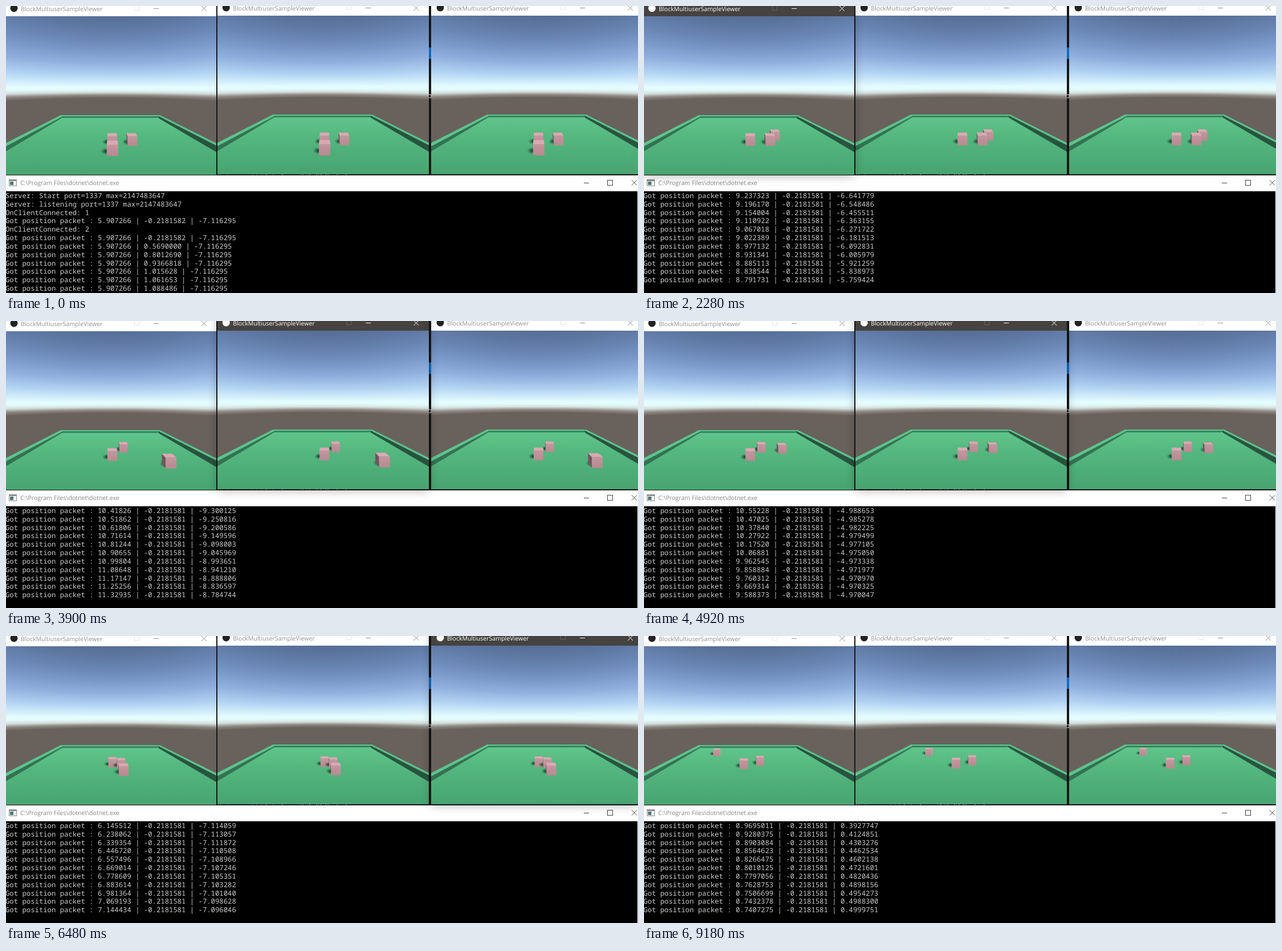
These frames come from a looping animation (1109 px wide and 505 px high, 9.24 s). An HTML page with a canvas:

```html
<!DOCTYPE html>
<html lang="en">
<head>
<meta charset="utf-8">
<title>Shared cubes</title>
<style>
  html, body { margin: 0; width: 100%; height: 100%; overflow: hidden; background: #000; }
  canvas { display: block; }
</style>
</head>
<body>
<canvas id="stage" width="1109" height="505"></canvas>
<script>
let ctx = document.getElementById('stage').getContext('2d');
const LOOP = 9240, STEP = 60, FIRST_MOVE = 900, LAST_MOVE = 8580, PACKET_MS = 16;
const LEAD_MS = 10, LAG_MS = 25;
const UI_FONT = '10.6px "Open Sans", "Noto Sans", sans-serif';
const MONO_FONT = '12.27px "Noto Sans Mono", "DejaVu Sans Mono", monospace';

// Key points of each player's walk: [ms, x, z]
const players = [
  { sends: 0, path: [[900, 5.907, -9.35], [1800, 9.7, -8.1], [2280, 8.78, -5.74], [2520, 7.28, -4.6],
    [5130, 7.28, -4.6], [5640, 5.95, -4.55], [7260, 5.95, -4.55], [7380, 5.95, -4.04],
    [7800, 3.9, -1.3], [8580, 0.7407275, 0.4999751]] },
  { sends: 2700, path: [[2760, 7.97, -7.116], [3430, 8.9, -9.85], [3900, 11.366, -8.759], [4200, 12.55, -7.2],
    [4750, 10.58, -4.99], [4920, 9.57, -4.970035], [5640, 6.97, -4.970035],
    [6700, 6.97, -4.970035], [6920, 7.15, -4]] },
  { sends: 6230, path: [[6230, 5.907, -7.116295], [6480, 7.191, -7.094], [6680, 7.72, -6.3],
    [7020, 6.3, -5.15], [7380, 5.167, -5.114]] }
];

// Monotone cubic interpolation: smooth, and still at the ends
function position(path, t) {
  const last = path.length - 1;
  if (t <= path[0][0]) return path[0].slice(1);
  if (t >= path[last][0]) return path[last].slice(1);
  const i = path.findIndex(p => p[0] > t) - 1;
  const span = path[i + 1][0] - path[i][0], u = (t - path[i][0]) / span;
  const slope = (j, k) => (path[j + 1][k] - path[j][k]) / (path[j + 1][0] - path[j][0]);
  const tangent = (j, k) => {
    if (j === 0 || j === last) return 0;
    const m = slope(j - 1, k), n = slope(j, k);
    return m * n > 0 ? 2 * m * n / (m + n) : 0;
  };
  return [1, 2].map(k => {
    const p = path[i][k], q = path[i + 1][k];
    return p + (q - p) * u * u * (3 - 2 * u) +
      span * u * (1 - u) * (tangent(i, k) * (1 - u) - tangent(i + 1, k) * u);
  });
}

function rect(x, y, w, h, color) { ctx.fillStyle = color; ctx.fillRect(x, y, w, h); }

function poly(color, ...points) {
  ctx.fillStyle = color;
  ctx.beginPath();
  points.forEach(p => ctx.lineTo(...p));
  ctx.fill();
}

function text(str, x, y, font, color) {
  ctx.font = font;
  ctx.textRendering = 'geometricPrecision';
  ctx.fillStyle = color;
  ctx.fillText(str, x, y);
}

function line(color, ...segments) {
  ctx.strokeStyle = color;
  ctx.lineWidth = 1;
  ctx.beginPath();
  for (const [x1, y1, x2, y2] of segments) { ctx.moveTo(x1, y1); ctx.lineTo(x2, y2); }
  ctx.stroke();
}

function cross(x, y, r, color) {
  line(color, [x - r, y - r, x + r, y + r], [x - r, y + r, x + r, y - r]);
}

function fade(top, bottom, ...colors) {
  const g = ctx.createLinearGradient(0, top, 0, bottom);
  colors.forEach((c, i) => g.addColorStop(i / (colors.length - 1), c));
  return g;
}

const HORIZON = 142, CENTRE = 184.5, FOCAL = 242;

// Lines of equal elevation bow away from the horizon towards the sides
function sky() {
  const above = fade(-124, 0, '#566e96', '#5f79a4', '#6986b4', '#7a99c9', '#91b0de', '#b2d2f2', '#e2fbff');
  const below = fade(0, 20, '#e4fdff', '#e4fbfb', '#d3dfdd', '#8d8782', '#69615c');
  for (let x = -3; x < 373; x++) {
    ctx.save();
    ctx.translate(0, HORIZON);
    ctx.scale(1, Math.hypot(1, (x - CENTRE) / FOCAL));
    rect(x, -124, 1, 124, above);
    rect(x, 0, 1, 156, below);
    ctx.restore();
  }
}

function table() {
  poly('#5cc48c', [96, 192], [270, 192], [372, 243], [372, 297], [-2, 297], [-2, 242]);
  poly('#35855f', [99, 194], [266, 194], [266, 197], [98, 197]);
  poly('#337253', [100, 194], [98, 198], [-2, 257], [-2, 248]);
  poly('#28543f', [266, 194], [268, 194], [372, 247], [372, 259], [268, 198]);
  poly(fade(195, 297, '#60c58c', '#55b87f', '#4eae78', '#48a470'),
    [98, 197], [267, 197], [372, 259], [372, 297], [-2, 297], [-2, 257]);
}

function renderScene() {
  const layer = document.createElement('canvas'), main = ctx;
  layer.width = 376;
  layer.height = 298;
  ctx = layer.getContext('2d');
  ctx.translate(3, 0);
  sky();
  table();
  ctx = main;
  return layer;
}
const scene = renderScene();

function project(x, height, z) {
  const s = 263 / (z + 23);
  return [CENTRE + (x - 5.79) * s, HORIZON + (5.6 - height) * s];
}

function cube([x, z]) {
  const corner = (dx, dy, dz) => project(x + dx / 2, dy / 2, z + dz / 2);
  const topL = corner(-1, 1, -1), topR = corner(1, 1, -1);
  const lowL = corner(-1, -1, -1), lowR = corner(1, -1, -1);
  const backL = corner(-1, 1, 1), backR = corner(1, 1, 1);
  const size = topR[0] - topL[0];

  ctx.save();
  ctx.translate(lowL[0] - size * .05, lowL[1] - size * .42);
  ctx.scale(size * .5, size * .32);
  const shade = ctx.createRadialGradient(0, 0, .2, 0, 0, 1);
  shade.addColorStop(0, 'rgba(22,60,44,.85)');
  shade.addColorStop(1, 'rgba(40,100,70,0)');
  rect(-1, -1, 2, 2, shade);
  ctx.restore();

  if (backL[0] < topL[0]) poly('#70555d', backL, topL, lowL, corner(-1, -1, 1));
  if (backR[0] > topR[0]) poly('#c4989f', backR, topR, lowR, corner(1, -1, 1));
  poly('#d9a9b3', backL, backR, topR, topL);
  poly(fade(topL[1], lowL[1], '#c4969d', '#b58a90'), topL, topR, lowR, lowL);
}

// left edge, right edge, content origin, vertical shift
const clients = [[0, 369, 0, 0], [371, 742, 372.3, -1], [746, 1109, 748, -1]];

function clientWindow([left, right, origin, dy], active, t) {
  const ink = active ? '#fff' : '#909090';
  ctx.save();
  if (active) {
    ctx.shadowColor = 'rgba(0,0,0,.3)';
    ctx.shadowBlur = 16;
    ctx.shadowOffsetY = 2;
  }
  rect(left, -20, right - left, 317 + dy, active ? '#454240' : '#fff');
  ctx.restore();

  ctx.save();
  ctx.beginPath();
  ctx.rect(left, 0, right - left, 297 + dy);
  ctx.clip();
  ctx.translate(origin, dy);

  ctx.fillStyle = active ? '#fff' : '#222';
  ctx.beginPath();
  ctx.arc(14, 4, 6.5, 0, 7);
  ctx.fill();
  text('BlockMultiuserSampleViewer', 26, 9, UI_FONT, ink);
  line(ink, [259, 4.5, 268, 4.5]);
  ctx.strokeStyle = active ? '#666' : '#e6e6e6';
  ctx.strokeRect(225.5, -.5, 8, 8);
  cross(347.5, 4.5, 4.5, ink);

  ctx.beginPath();
  ctx.rect(-3, 18, 376, 280);
  ctx.clip();
  ctx.drawImage(scene, -3, 0);
  const seenAt = t + (active ? LEAD_MS : -LAG_MS);
  players.map(p => position(p.path, seenAt)).sort((p, q) => q[1] - p[1]).forEach(cube);
  ctx.restore();
}

function backdrop() {
  rect(0, 0, 1109, 505, '#161616');
  let seed = 7;
  for (let x = 60; x < 600; x += 4) {
    seed = seed * 137 % 1009;
    if (seed % 3 === 0) rect(x, 296, 1 + seed % 2, 1, '#777');
  }
  rect(741, 73, 6, 20, '#0f6cbd');
  text('o', 740, 162, MONO_FONT, '#ddd');
}

function consoleBar() {
  rect(0, 298, 1109, 207, '#fff');
  rect(5, 305, 14, 12, '#8c8c8c');
  rect(6, 308, 12, 8, '#f4f4f4');
  rect(7, 309, 6, 6, '#4b7a76');
  text('C:\\Program Files\\dotnet\\dotnet.exe', 25, 315, UI_FONT, '#858585');
  line('#444', [1014, 311.5, 1023, 311.5]);
  ctx.strokeRect(1055.5, 306.5, 9, 9);
  cross(1102.5, 311, 4.5, '#444');
}

const packet = (...xyz) => 'Got position packet : ' + xyz.map(v => v.toPrecision(7)).join(' | ');
const restingAt = y => packet(5.907266, y, -7.116295);
const startLog = [
  'Server: Start port=1337 max=2147483647',
  'Server: listening port=1337 max=2147483647',
  'OnClientConnected: 1',
  restingAt(-0.2181582),
  'OnClientConnected: 2',
  restingAt(-0.2181582),
  ...Array.from({ length: 6 }, (_, n) => restingAt(1.126 - .557 * .583 ** n))
];

function loggedLine(k) {
  if (k < 0) return startLog[startLog.length + k];
  const t = FIRST_MOVE + k * PACKET_MS;
  const sender = t > 7400 ? players[0] : players.findLast(p => t >= p.sends);
  const [x, z] = position(sender.path, t);
  return packet(x, -0.2181581, z);
}

function logLines(t) {
  if (t < FIRST_MOVE) return startLog;
  const newest = Math.floor((Math.min(t, LAST_MOVE) - FIRST_MOVE) / PACKET_MS);
  return Array.from({ length: 11 }, (_, i) => loggedLine(newest - 10 + i));
}

function consoleText(t) {
  rect(0, 326, 1108, 179, '#000');
  logLines(t).forEach((str, row) => text(str, -1, 338 + row * 14.82, MONO_FONT, '#ccc'));
}

function activeWindow(t) {
  if (t < 600 || t >= 9180) return -1;
  return t < 2580 ? 0 : t < 5880 ? 1 : 2;
}

function draw(now) {
  const t = Math.floor(now % LOOP / STEP) * STEP;
  const active = activeWindow(t);
  backdrop();
  consoleBar();
  clients.forEach((c, i) => { if (i !== active) clientWindow(c, false, t); });
  if (active >= 0) clientWindow(clients[active], true, t);
  consoleText(t);
}

const began = performance.now();
function tick() {
  draw(performance.now() - began);
  requestAnimationFrame(tick);
}
tick();
</script>
</body>
</html>
```
